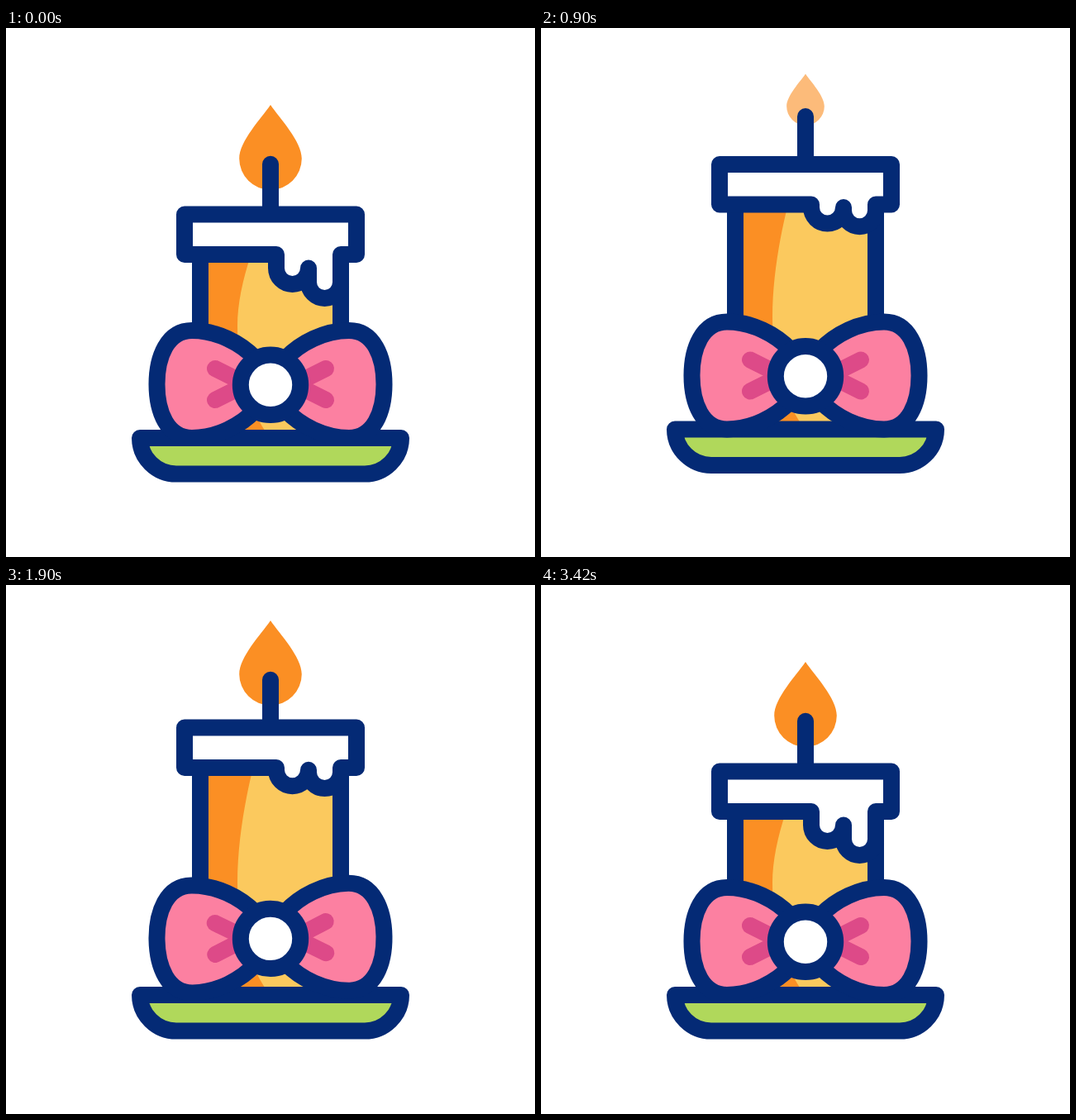
An HTML page that plays this animation: 640x640 px, repeating every 3.6 s.

```html
<!DOCTYPE html>
<html lang="en">
<head>
<meta charset="utf-8">
<title>Candle</title>
<style>
html, body { margin: 0; width: 100%; height: 100%; overflow: hidden; background: #fff; }
svg { display: block; width: 100%; height: 100%; }
.line { stroke: #042a75; stroke-width: 20; stroke-linecap: round; stroke-linejoin: round; }
</style>
</head>
<body>
<svg viewBox="0 0 640 640" fill="none">
  <defs>
    <path id="drop" fill="#fb8f24" d="M320 93C331 109 357.8 137 357.8 158A37.8 37.8 0 0 1 282.2 158C282.2 137 309 109 320 93Z"/>
    <g id="lobe">
      <path class="line" fill="#fc80a1" d="M302 400C284 381 255 366 225 366C195 366 182.5 398 182.5 431S195 496 225 496C255 496 284 481 302 462"/>
      <path stroke="#dd4a88" stroke-width="20" stroke-linecap="round" d="M253 412L287 429M253 450L287 433"/>
    </g>
  </defs>
  <g id="all">
    <use id="halo" href="#drop"/>
    <use id="flame" href="#drop"/>
    <path id="wick" class="line"/>
    <path id="body" fill="#fbc95e"/>
    <path id="shade" fill="#fb8f24"/>
    <path id="sides" class="line"/>
    <path id="cap" class="line" fill="#fff"/>
    <path class="line" fill="#b0d85b" d="M162 496H478C478 520 458 539.5 434 539.5H206C182 539.5 162 520 162 496Z"/>
    <g id="bow">
      <use href="#lobe"/>
      <use href="#lobe" transform="matrix(-1 0 0 1 640 0)"/>
      <circle class="line" fill="#fff" cx="320" cy="431.8" r="36.2"/>
    </g>
  </g>
</svg>
<script>
const LOOP = 3600;
const $ = id => document.getElementById(id);
const set = (id, attrs) => { for (const k in attrs) $(id).setAttribute(k, attrs[k]); };
const clamp = u => Math.min(1, Math.max(0, u));
const smooth = u => u * u * (3 - 2 * u);

// Eased value through [time, value] keys
function track(t, keys) {
  let v = keys[0][1];
  for (let i = 1; i < keys.length; i++) {
    const [t0, v0] = keys[i - 1], [t1, v1] = keys[i];
    if (t >= t0) v = v0 + (v1 - v0) * smooth(clamp((t - t0) / (t1 - t0)));
  }
  return v;
}

const GROW = [[200, 0], [1200, 1], [1580, 1], [2820, 0]];
const JUMP = [[600, 0], [800, -21.4], [1000, 0]];
const FLAME = [[600, 1], [1300, 0], [1590, 0], [1905, 1]];
const HOP = [[1200, 0], [1600, -25.6], [2000, 0], [2400, -25.6], [2820, 0]];
const TILT = [[1200, 0], [1600, 7.1], [2200, -8.6], [2600, 7.1], [2820, 0]];

const scaled = (s, dy) => `translate(320 ${144.3 + dy}) scale(${s}) translate(-320 -144.3)`;

function draw(t) {
  const p = track(t, GROW), rise = -63.6 * p, lift = rise + 3.5 * p;
  const top = 274 + rise, drip = 1 - p;
  const f = track(t, FLAME);
  const burst = clamp((t - 2900) / 520);

  set('all', { transform: `translate(0 ${track(t, JUMP)})` });
  set('flame', { transform: scaled(f, lift), opacity: f });
  set('halo', { transform: scaled(1 + 1.3 * smooth(burst), lift), opacity: burst > 0 ? 1 - burst : 0 });
  set('wick', { d: `M320 ${164.8 + lift}V${225.5 + rise}` });
  set('body', { d: `M235 ${top}H405V496H235Z` });
  set('shade', { d: `M235 ${top}H${296.5 + 3 * p}C${286 + 3 * p} ${305 + rise * .8} 280 ${335 + rise * .4} 280 360C280 410 292 455 315 490H235Z` });
  set('sides', { d: `M235 ${top}V496M405 ${top}V496` });
  set('cap', { d: `M216 ${225.5 + rise}H424V${top}H405v${33.5 * drip}a19.5 19.5 0 0 1-39 0V${top + 16.5 * drip}a19.5 19.5 0 0 1-39 0V${top}H216Z` });
  set('bow', { transform: `translate(0 ${track(t, HOP)}) rotate(${track(t, TILT)} 320 431.8)` });
}

const start = performance.now();
function tick() {
  draw((performance.now() - start) % LOOP);
  requestAnimationFrame(tick);
}
tick();
</script>
</body>
</html>
```
